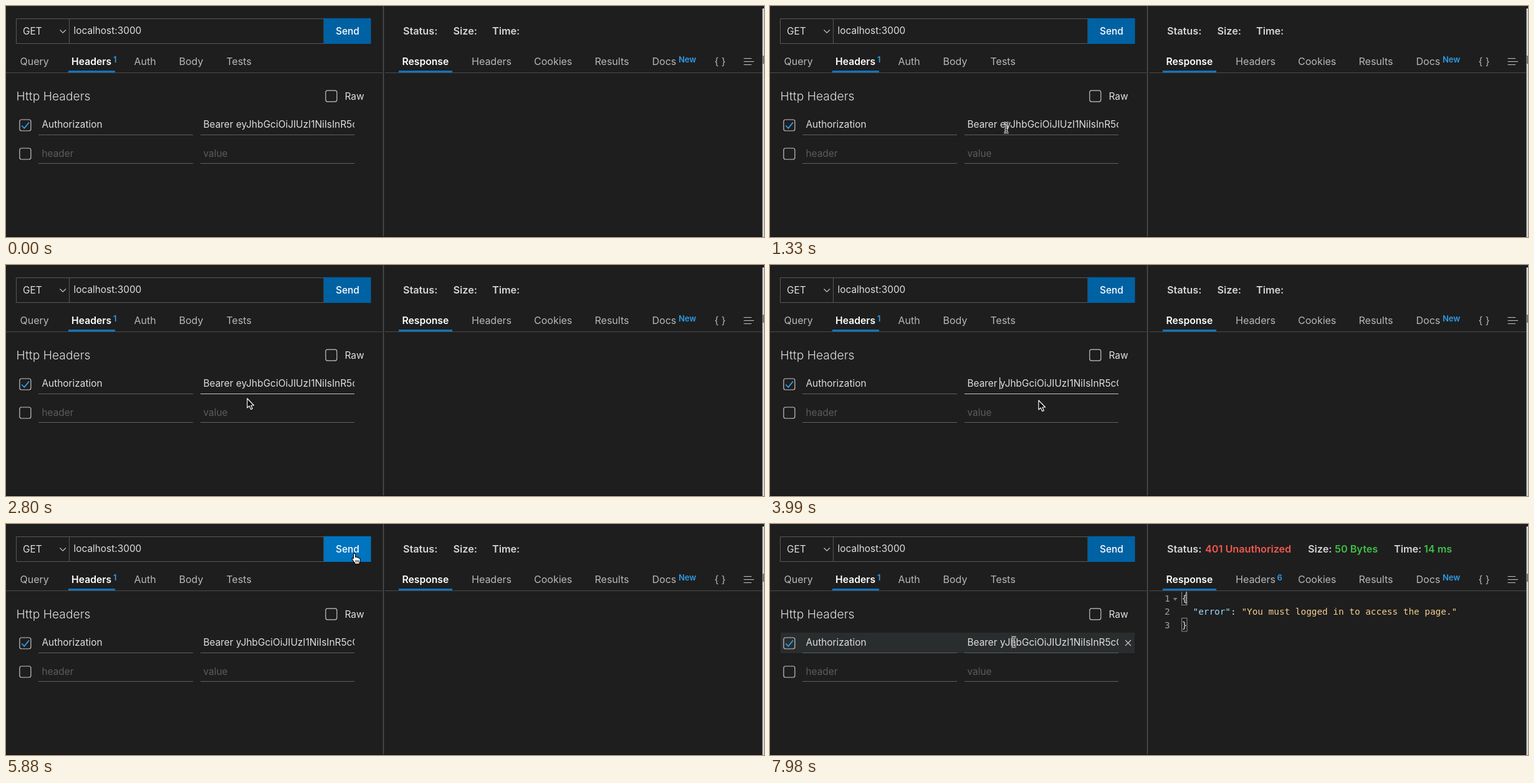
Animation of 1216 by 372 pixels, one loop 8000 ms. Source, as an HTML page:

```html
<!DOCTYPE html>
<html lang="en">
<head>
<meta charset="utf-8">
<title>REST client</title>
<style>
html, body { margin: 0; width: 100%; height: 100%; overflow: hidden; background: #1e1e1e; }
svg { display: block; width: 1216px; height: 372px; }
text { font: 15.4px Inter, sans-serif; fill: #dedede; white-space: pre; }
.tab { font-size: 16px; fill: #b8b8b8; }
.on { font-size: 15.7px; font-weight: 600; fill: #fff; }
.send { font-weight: 500; fill: #fff; }
.stat { font-size: 16.2px; font-weight: 600; fill: #d6d6d6; }
.red { fill: #f1584f; }
.green { fill: #3fbf45; }
.sup { font-size: 13px; font-weight: 600; fill: #2f9be8; }
.title { font-size: 19.3px; font-weight: 300; }
.dim { fill: #5c5c5c; }
.code { font: 14.36px "DejaVu Sans Mono", monospace; }
.num { fill: #a4a4a4; }
.key { fill: #9cdcfe; }
.str { fill: #f3cf8c; }
.line { fill: none; stroke: #4b4b4b; }
.icon { fill: none; stroke: #c5c5c5; stroke-width: 1.2; }
</style>
</head>
<body>
<svg viewBox="0 0 1216 372" xmlns="http://www.w3.org/2000/svg">
  <defs>
    <clipPath id="field"><rect x="312" y="176" width="247" height="32"/></clipPath>
    <clipPath id="pane"><rect x="608" y="109" width="605" height="260"/></clipPath>
  </defs>
  <rect width="1216" height="372" fill="#1e1e1e"/>
  <rect id="row" x="17" y="175" width="568" height="33" fill="#2a2d2e"/>

  <!-- frame lines -->
  <path class="line" d="M0 107.5H604M608 107.5H1213"/>
  <path d="M605.5 0V372" stroke="#505050" stroke-width="1.5"/>
  <path d="M0 371.5H1216" stroke="#111"/>
  <rect x="1213.5" y="4" width="2.5" height="368" fill="#d8d8d8"/>
  <rect x="1213" y="80" width="3" height="13" fill="#777"/>

  <!-- address bar -->
  <path class="line" d="M16.5 20.5H510V60.5H16.5ZM101.5 20.5V60.5" style="stroke:#585858"/>
  <rect id="send" x="509.7" y="19.7" width="75.8" height="41.3"/>
  <path class="icon" d="M86.5 38.5L91.2 43.2L96 38.5"/>

  <g id="labels"></g>
  <rect x="100" y="104" width="75" height="3" fill="#0f75bf"/>
  <rect x="630" y="104" width="86" height="3" fill="#0f75bf"/>
  <path class="icon" d="M1183.5 84.5H1196M1183.5 89.5H1200M1183.5 94.5H1196"/>

  <!-- header rows -->
  <g class="icon">
    <rect x="512.8" y="136.1" width="18" height="18" rx="3"/>
    <rect x="21.9" y="183" width="18" height="18" rx="3"/>
    <rect x="21.9" y="229" width="18" height="18" rx="3"/>
  </g>
  <path d="M25.2 192.5L29.3 196.8L37 187.4" fill="none" stroke="#2f9be8" stroke-width="1.8"/>
  <path class="line" d="M52 207.5H300M52 253.5H300M312 253.5H559" style="stroke:#606060"/>
  <path id="under" d="M312 207.5H559"/>
  <g clip-path="url(#field)"><text id="token" x="316.5" y="196"></text></g>
  <path id="caret" stroke="#ddd" stroke-width="1.3"/>
  <path id="cross" class="icon" d="M570 187L579 196M579 187L570 196"/>

  <g id="idle"></g>
  <g id="reply">
    <g id="result"></g>
    <g clip-path="url(#pane)">
      <path class="icon" d="M660.5 108V130.5H669V108M660.5 151.5H669V173H660.5Z" style="stroke:#8a8a8a;stroke-width:1"/>
      <path d="M646.5 119H653.5L650 123.5Z" fill="#777"/>
      <g id="json"></g>
      <path d="M667.5 109V129" stroke="#ccc"/>
    </g>
  </g>

  <g id="arrow"><path d="M0 0V15L3.4 11.9L5.8 17.5L8.3 16.4L6 11H10.6Z" fill="#000" stroke="#fff" stroke-width="1.2" stroke-linejoin="round"/></g>
  <g id="beam" fill="none">
    <path d="M-3.5 -8Q0 -8 0 -5.5Q0 -8 3.5 -8M0 -6V6M-3.5 8Q0 8 0 5.5Q0 8 3.5 8M-2.5 3H2.5" stroke="#fff" stroke-width="3.2"/>
    <path d="M-3.5 -8Q0 -8 0 -5.5Q0 -8 3.5 -8M0 -6V6M-3.5 8Q0 8 0 5.5Q0 8 3.5 8M-2.5 3H2.5" stroke="#111" stroke-width="1.2"/>
  </g>
  <g id="hand">
    <path d="M-1.5 7V1.2Q-1.5 -.6 0 -.6T1.6 1.2V5.2Q4 4.6 4.4 6Q6.6 5.4 7 7Q9.2 6.6 9.2 8.8V11.2Q9 13 8 14.4V16.4H.6V15Q-1.6 12.8 -3.2 9.6Q-4.6 7.4 -3.4 6.7Q-2.4 6.3 -1.5 8Z" fill="#fff" stroke="#000" stroke-width="1.1"/>
    <path d="M2 10V14M4.2 10V14M6.4 10V14" stroke="#000" stroke-width=".9"/>
  </g>
</svg>
<script>
const LOOP = 8000, STEP = 70;
const $ = id => document.getElementById(id);
const show = (id, on) => $(id).style.display = on ? "" : "none";
const within = (t, ...spans) => spans.some(([a, b]) => t >= a && t < b);

function put(parent, rows) {
  for (const [x, y, str, cls = ""] of rows) {
    const el = document.createElementNS("http://www.w3.org/2000/svg", "text");
    el.setAttribute("x", x);
    el.setAttribute("y", y);
    el.setAttribute("class", cls);
    el.textContent = str;
    $(parent).append(el);
  }
}

put("labels", [
  [27, 46, "GET"], [108.5, 45, "localhost:3000"], [529, 45.5, "Send", "send"],
  [22.5, 94.5, "Query", "tab"], [105, 94.5, "Headers", "tab on"], [172, 90.5, "1", "sup"],
  [205.5, 94.5, "Auth", "tab"], [277.5, 94.5, "Body", "tab"], [353.5, 94.5, "Tests", "tab"],
  [635.5, 94.5, "Response", "tab on"], [747, 94.5, "Headers", "tab"],
  [847, 94.5, "Cookies", "tab"], [944.5, 94.5, "Results", "tab"],
  [1036.5, 94.5, "Docs", "tab"], [1079, 90.5, "New", "sup"], [1136.5, 94.5, "{ }", "tab"],
  [16.5, 151.5, "Http Headers", "title"], [543.5, 150.5, "Raw"], [57.5, 196, "Authorization"],
  [57.5, 242.5, "header", "dim"], [316.5, 242.5, "value", "dim"],
  [637, 46, "Status:", "stat"]
]);
put("idle", [[717.5, 46, "Size:", "stat"], [780, 46, "Time:", "stat"]]);
put("result", [
  [698, 46, "401 Unauthorized", "stat red"], [863, 46, "Size:", "stat"],
  [906, 46, "50 Bytes", "stat green"], [1001, 46, "Time:", "stat"],
  [1049, 46, "14 ms", "stat green"], [813.5, 90.5, "6", "sup"]
]);
put("json", [
  [633, 124.5, "1", "code num"], [633, 146, "2", "code num"], [633, 167.5, "3", "code num"],
  [660.5, 124.5, "{", "code"], [678.5, 146, '"error"', "code key"], [739, 146, ":", "code"],
  [756.4, 146, '"You must logged in to access the page."', "code str"], [660.5, 167.5, "}", "code"]
]);

// pointer stops: time, x, y
const path = [
  [1260, 386, 290], [1330, 379, 196], [1470, 380, 203], [1540, 383, 207], [1680, 383, 208],
  [1820, 383, 208], [1960, 378, 197], [2170, 376, 192], [2520, 376, 192],
  [2660, 381, 204], [2800, 387, 215], [3430, 387, 215], [3500, 388, 215], [3710, 390, 216],
  [3780, 390, 216], [3990, 431, 218], [4620, 470, 206], [4760, 470, 206],
  [5110, 569, 104], [5390, 560, 58], [5600, 559, 48], [7210, 559, 48],
  [7490, 520, 92], [7840, 401, 182], [7980, 391, 190]
];

function pointer(t) {
  let i = path.findIndex(p => p[0] > t);
  if (i < 0) return path[path.length - 1].slice(1);
  const [a, ax, ay] = path[Math.max(0, i - 1)], [b, bx, by] = path[i];
  const k = Math.max(0, (t - a) / (b - a));
  return [ax + (bx - ax) * k, ay + (by - ay) * k];
}

function draw(t) {
  t = Math.floor(t / STEP) * STEP;
  const hover = within(t, [1400, 1540], [1960, 2730], [7840, LOOP]);
  const sendHover = within(t, [5390, 7350]);
  const focus = within(t, [2100, 5670]);
  const cut = t >= 3500;
  const replied = t >= 5950;

  show("row", hover);
  show("cross", hover);
  $("send").setAttribute("fill", sendHover ? "#0074bf" : "#0062a3");
  $("under").setAttribute("stroke", focus ? "#c4c4c4" : "#606060");
  $("token").textContent = "Bearer " + (cut ? "" : "e") + "yJhbGciOiJIUzI1NiIsInR5cCI6IkpXVCJ9";
  $("caret").setAttribute("d", `M${cut ? 368.7 : 377} 181V200`);
  show("caret", within(t, [2240, 2800], [3360, 4130], [4690, 5180]));
  show("idle", !replied);
  show("reply", replied);

  const [x, y] = pointer(t);
  const kind = sendHover ? "hand" : within(y, [178, 207]) && x < 560 ? "beam" : "arrow";
  for (const id of ["arrow", "beam", "hand"]) {
    show(id, t >= 1260 && id === kind);
    $(id).setAttribute("transform", `translate(${x} ${y})`);
  }
}

const start = performance.now();
function tick() {
  draw((performance.now() - start) % LOOP);
  requestAnimationFrame(tick);
}
draw(0);
requestAnimationFrame(tick);
</script>
</body>
</html>
```
